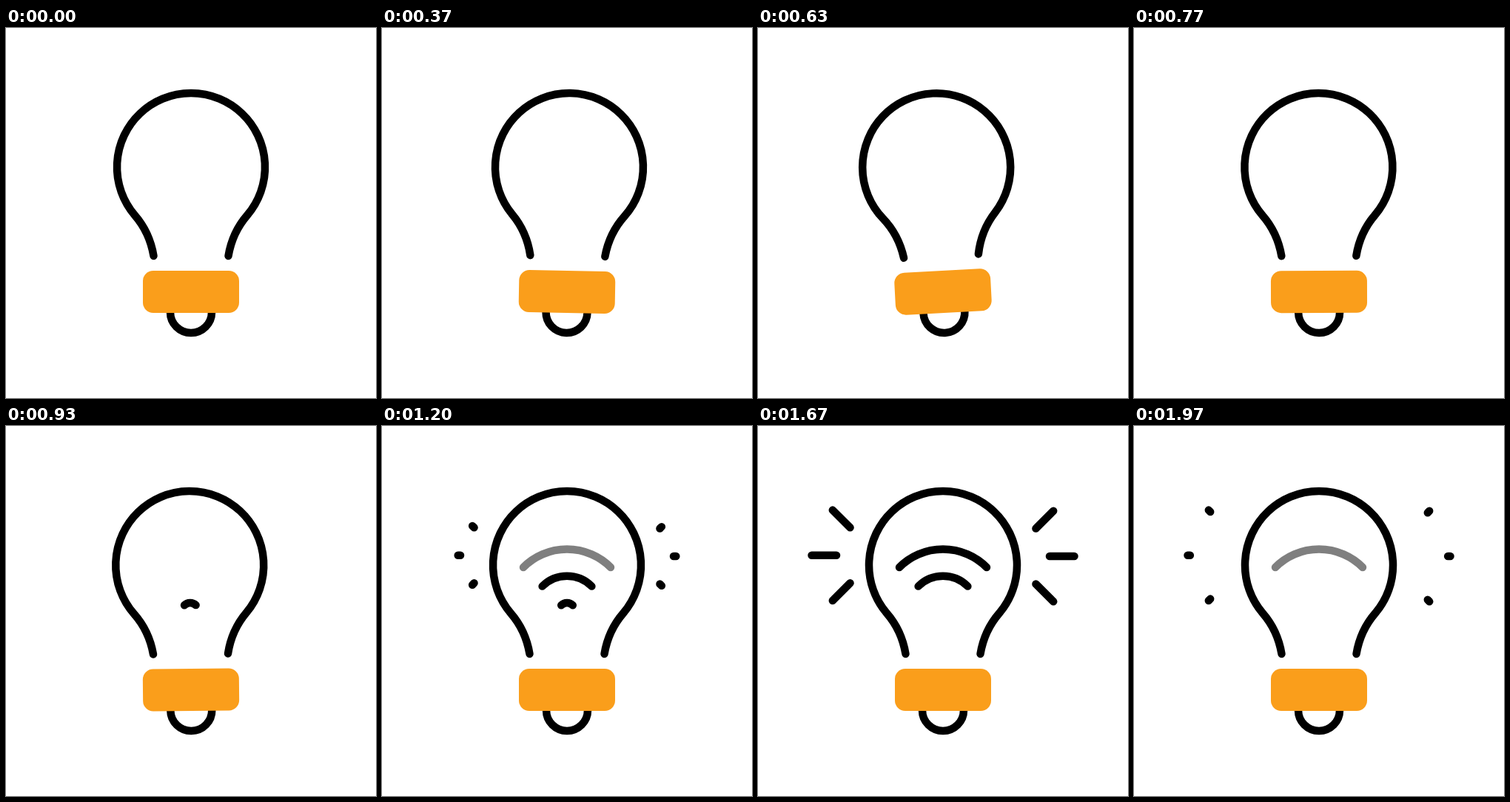
An HTML page that plays this animation: 500 by 500 pixels, repeating every 2000 ms.

```html
<!DOCTYPE html>
<html lang="en">
<head>
<meta charset="utf-8">
<title>Smart bulb</title>
<style>
  html, body { margin: 0; width: 100%; height: 100%; overflow: hidden; background: #fff; }
  svg { display: block; width: 100%; height: 100%; }
  path { fill: none; stroke: #000; stroke-width: 10.5; stroke-linecap: round; stroke-linejoin: round; }
</style>
</head>
<body>
<svg viewBox="0 0 500 500">
  <g id="bulb">
    <path d="M199.5 308 C196 287 187 268 174 253 A100 100 0 1 1 326 253 C313 268 304 287 300.5 308"/>
    <path d="M222 380 V384 A28 28 0 0 0 278 384 V380"/>
    <rect x="185" y="328" width="130" height="57" rx="14" fill="#fa9e1b"/>
    <g id="waves"></g>
  </g>
  <g id="rays"></g>
</svg>
<script>
const LOOP = 2000;
const FRAMES = 60;
const BEAT = 5; // frames between key poses
const CENTER = 250;

// Degrees at each beat, starting at SWING_START
const SWING = [0, 5, -5, 3, -3, 0];
const SWING_START = 10;

const bulb = document.getElementById('bulb');

function addPath(parentId, d = '') {
  const path = document.createElementNS('http://www.w3.org/2000/svg', 'path');
  path.setAttribute('d', d);
  return document.getElementById(parentId).appendChild(path);
}

const progress = (frame, start, length) => Math.min(1, Math.max(0, (frame - start) / length));

// Concentric quarter arcs, evenly spaced
const waves = [0, 1, 2].map(i => {
  const half = 7.8 + 25.6 * i;
  const radius = half * Math.SQRT2;
  const y = CENTER - half;
  return addPath('waves', `M${CENTER - half} ${y} A${radius} ${radius} 0 0 1 ${CENTER + half} ${y}`);
});

// Three rays per side: one level, two at 45 degrees
const rays = [];
for (const side of [-1, 1]) {
  for (const tilt of [-1, 0, 1]) {
    const angle = tilt * Math.PI / 4;
    const x = CENTER + side * (144 - 18.5 * Math.abs(tilt));
    const y = 175.4 + 0.6 * side + 37.5 * tilt;
    const pointAt = k =>
      `${x + side * 33.5 * k * Math.cos(angle)} ${y + 33.5 * k * Math.sin(angle)}`;
    rays.push({ path: addPath('rays'), pointAt });
  }
}

function swingAngle(frame) {
  return SWING.slice(1).reduce((angle, to, i) =>
    angle + (to - SWING[i]) * progress(frame, SWING_START + i * BEAT, BEAT), 0);
}

function draw(frame) {
  bulb.setAttribute('transform', `rotate(${swingAngle(frame)} ${CENTER} 356.5)`);

  waves.forEach((wave, i) => {
    const fade = start => progress(frame, start + i * BEAT, 2);
    wave.setAttribute('opacity', fade(25) - fade(48));
  });

  // Rays grow outwards, then shrink towards their outer end
  const head = progress(frame, 35, 10);
  const tail = progress(frame, 50, 10);
  for (const { path, pointAt } of rays) {
    path.setAttribute('d', head > tail ? `M${pointAt(tail)} L${pointAt(head)}` : '');
  }
}

const startTime = performance.now();

function tick() {
  const time = (performance.now() - startTime) % LOOP;
  // 30 frames per second, each starting on a multiple of 10 ms
  const frame = Math.floor((Math.floor(time / 10) * 10 + 4) * FRAMES / LOOP);
  draw(frame % FRAMES);
  requestAnimationFrame(tick);
}
tick();
</script>
</body>
</html>
```
